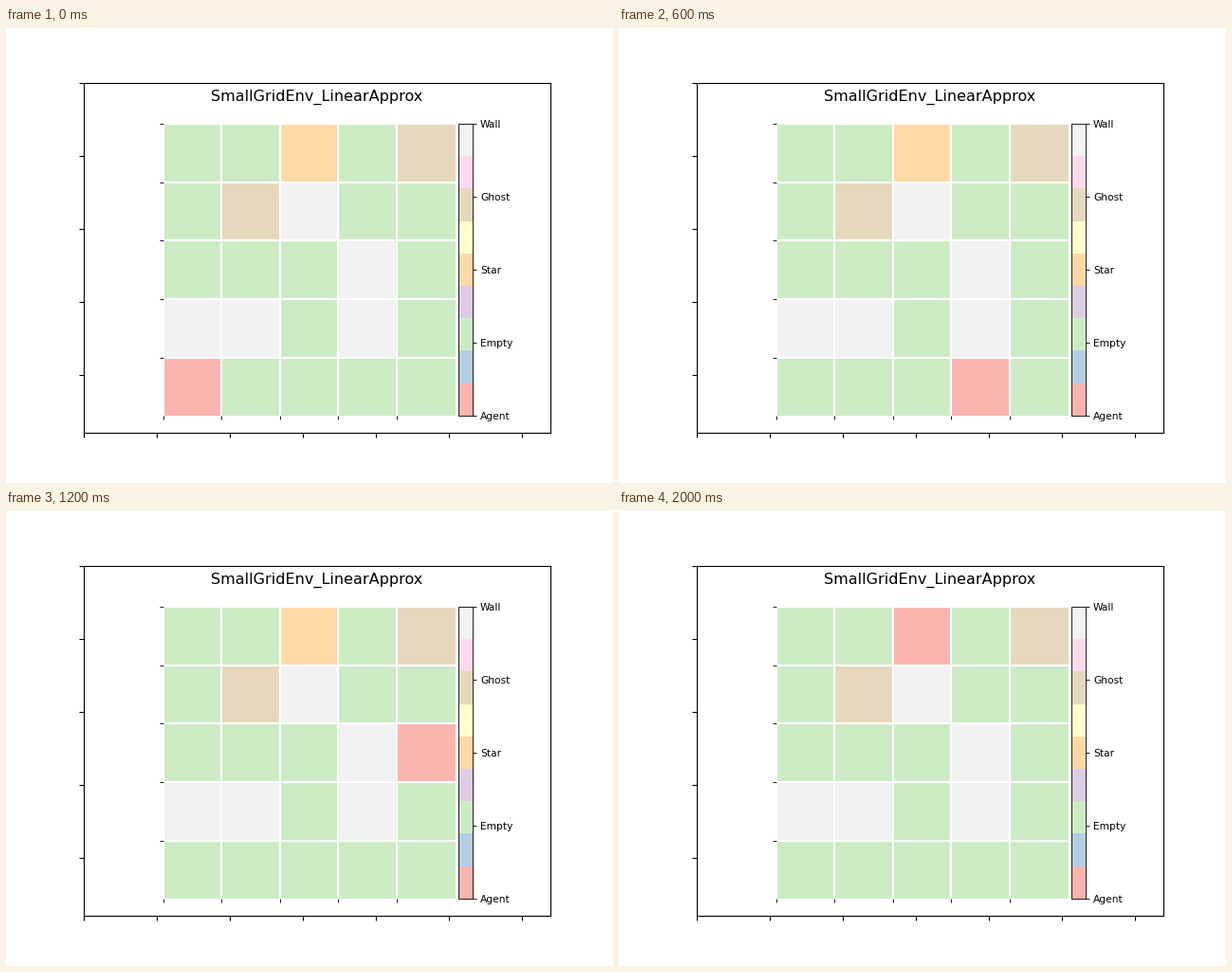
A matplotlib script for the animation above (2200 ms loop, 640 by 480 pixels).

```python
import numpy as np
import matplotlib.pyplot as plt
from matplotlib.animation import FuncAnimation
from matplotlib.patches import Rectangle

W, H = 640, 480
SCALE = 0.77                    # the panel is a 640x480 canvas shown at this scale
LEFT, TOP, SIZE, N = 109, 56.5, 400, 5
BAR_X, BAR_W = 513.5, 20
TICK = 3.5 * 100 / 72           # tick length and label padding
THIN = 0.8 * SCALE

AGENT, EMPTY, STAR, GHOST, WALL = 0, 2, 4, 6, 8
NAMES = ["Agent", "Empty", "Star", "Ghost", "Wall"]
LEVEL = {".": EMPTY, "*": STAR, "g": GHOST, "#": WALL}
MAZE = ["..*.g",
        ".g#..",
        "...#.",
        "##.#.",
        "....."]
GRID = np.array([[LEVEL[c] for c in row] for row in MAZE])

START = (4, 0)
STEP = {"R": (0, 1), "L": (0, -1), "U": (-1, 0)}
MOVES = "RRRRUUULUL"

plt.rcParams["font.family"] = "DejaVu Sans"
fig = plt.figure(figsize=(W / 100, H / 100), dpi=100, facecolor="white")
ax = fig.add_axes([81.6 / W, 0.11, W * SCALE / W, SCALE])


def agent_at(frame):
    row, col = START
    for move in MOVES[:frame]:
        row, col = row + STEP[move][0], col + STEP[move][1]
    return row, col


def line(xs, ys, color="black", width=THIN, z=3):
    ax.plot(xs, ys, color=color, lw=width, solid_capstyle="butt", zorder=z)


def palette_image(data, extent):
    return ax.imshow(data, cmap="Pastel1", vmin=0, vmax=8, extent=extent,
                     interpolation="nearest", aspect="auto", zorder=1)


right, bottom = LEFT + SIZE, TOP + SIZE
cells = palette_image(GRID, (LEFT, right, bottom, TOP))

# white separators, then ticks at the start of every cell
offsets = np.arange(N) * SIZE / N
for d in offsets:
    line([LEFT + d] * 2, [TOP, bottom], "white", 2 * SCALE, 2)
    line([LEFT, right], [TOP + d] * 2, "white", 2 * SCALE, 2)
for d in offsets:
    line([LEFT + d] * 2, [bottom, bottom + TICK])
    line([LEFT - TICK, LEFT], [TOP + d] * 2)

# colour bar
bar_end = BAR_X + BAR_W
palette_image(np.arange(9)[::-1, None], (BAR_X, bar_end, bottom, TOP))
ax.add_patch(Rectangle((BAR_X, TOP), BAR_W, SIZE, fill=False,
                       ec="black", lw=THIN, zorder=3))
for i, name in enumerate(NAMES):
    y = bottom - i * SIZE / 4
    line([bar_end, bar_end + TICK], [y, y])
    ax.text(bar_end + 2 * TICK, y, name, fontsize=10 * SCALE,
            ha="left", va="center_baseline")

ax.text(W / 2, 0.02 * H, "SmallGridEnv_LinearApprox", fontsize=15 * SCALE,
        ha="center", va="top")

ax.set_xlim(0, W)
ax.set_ylim(H, 0)
ax.set_xticks(np.arange(0, W, 100) + 0.5)
ax.set_yticks(np.arange(0, H, 100) + 0.5)
ax.tick_params(labelbottom=False, labelleft=False)


def update(frame):
    state = GRID.copy()
    state[agent_at(frame)] = AGENT
    cells.set_data(state)
    return [cells]


anim = FuncAnimation(fig, update, frames=len(MOVES) + 1, interval=200,
                     repeat=True, repeat_delay=0, blit=False)
plt.show()
```
